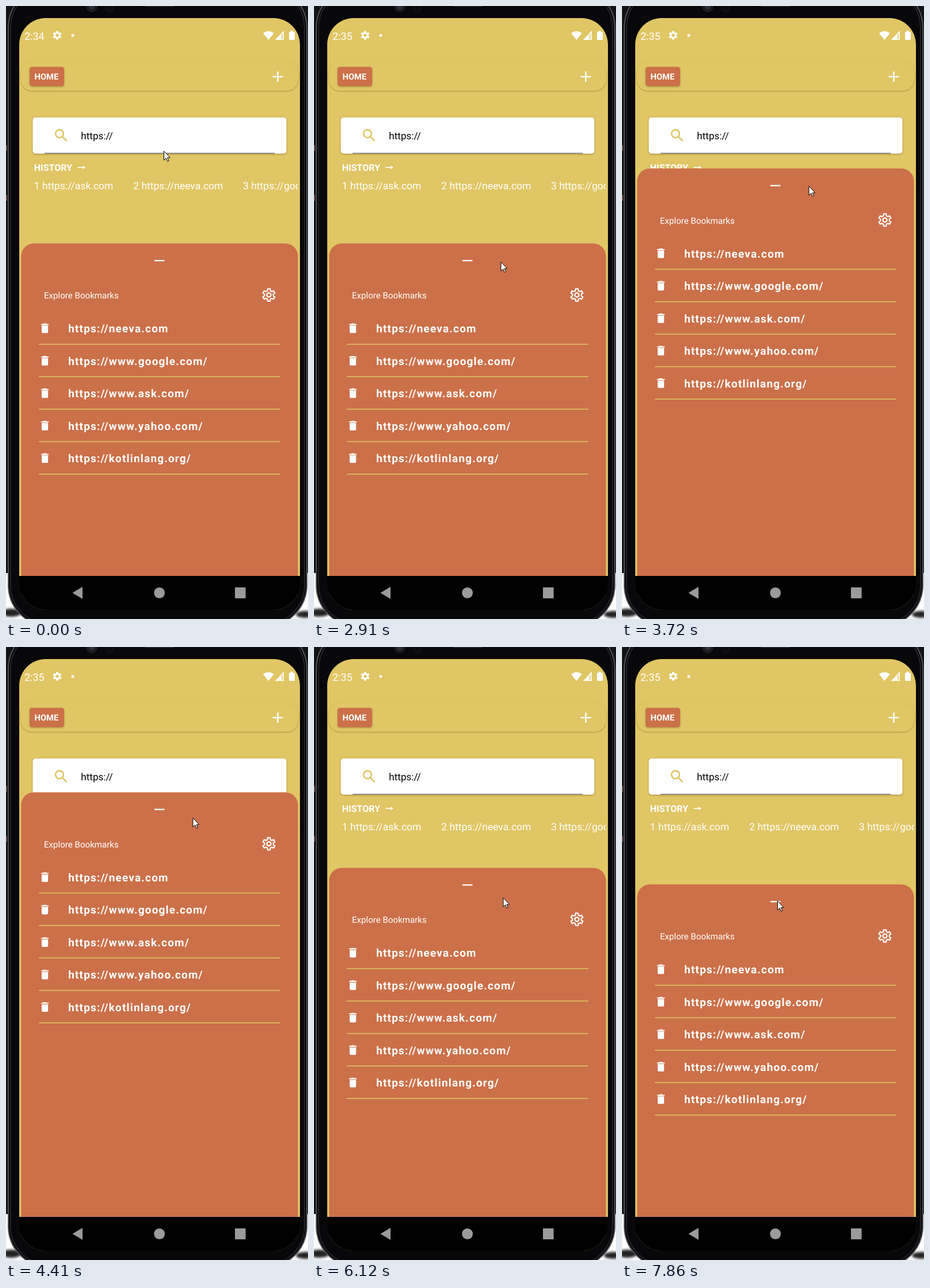
An HTML page for the animation above (8000 ms loop, 525 by 1067 pixels).

```html
<!DOCTYPE html>
<html lang="en">
<head>
<meta charset="utf-8">
<title>Bookmarks sheet</title>
<style>
  html, body { margin: 0; width: 100%; height: 100%; overflow: hidden; background: #0b0b0d; }
  svg { display: block; width: 525px; height: 1067px; }
  text { font-family: Roboto, "Liberation Sans", sans-serif; fill: #fff; white-space: pre; text-rendering: geometricPrecision; }
  .bold { font-weight: 700; }
  .url { font-size: 19px; font-weight: 700; letter-spacing: 1.17px; }
  .hist { font-size: 17.55px; }
  .white { fill: #fff; }
  .gold { fill: #e0c664; }
  .rust { fill: #cc7049; }
  .card { filter: drop-shadow(0 1.5px 1.5px rgba(70, 50, 0, .4)); }
  .bar { filter: drop-shadow(0 1.5px 1.2px rgba(70, 50, 0, .35)); }
</style>
</head>
<body>
<svg viewBox="0 0 525 1067">
  <defs>
    <clipPath id="screen"><rect x="23" y="21" width="488" height="1030" rx="46"/></clipPath>
    <clipPath id="list"><rect x="26" y="295" width="481.5" height="40"/></clipPath>
    <filter id="soft" x="-50%" y="-50%" width="200%" height="200%"><feGaussianBlur stdDeviation="2"/></filter>
    <path id="trash" d="M6 19c0 1.1.9 2 2 2h8c1.1 0 2-.9 2-2V7H6zM19 4h-3.5l-1-1h-5l-1 1H5v2h14z"/>
  </defs>

  <!-- backdrop and phone body -->
  <rect width="525" height="1067" fill="#121315"/>
  <g fill="#8a6252" opacity=".7">
    <rect y="242" width="2" height="10"/><rect y="329" width="2" height="10"/>
  </g>
  <rect class="white" y="987" width="525" height="80"/>
  <g fill="#222" filter="url(#soft)">
    <ellipse cx="9" cy="1056" rx="18" ry="7"/><ellipse cx="520" cy="1059" rx="16" ry="6"/>
  </g>
  <rect x="4" y="-34" width="519" height="1114" rx="72" fill="#08080a" stroke="#505356" stroke-width="2"/>
  <rect x="8" y="-30" width="511" height="1106" rx="68" fill="none" stroke="#222326" stroke-width="2"/>
  <circle cx="149" cy="1" r="10" fill="#1b1c20"/>
  <circle cx="149" cy="1" r="5" fill="#2e3138"/>
  <circle cx="180" cy="4" r="6" fill="#0c0c0e" stroke="#1c1c1f"/>
  <rect x="241" y="-4" width="52" height="5" rx="2" fill="#3a3a3c"/>

  <g clip-path="url(#screen)">
    <rect class="gold" x="23" y="21" width="488" height="972"/>

    <!-- status bar -->
    <text id="clock" x="32" y="58.6" font-size="18">2:34</text>
    <path class="gear white" transform="translate(89 51) scale(.8)"/>
    <circle class="gold" cx="89" cy="51" r="2.8"/>
    <circle class="white" cx="116" cy="51.3" r="2.5"/>
    <path class="white" d="M447 47.5Q456.3 40 465.6 47.5L456.3 59z"/>
    <path class="white" d="M483 44V59H468z" opacity=".45"/>
    <path class="white" d="M478 49V59H468z"/>
    <path d="M482.3 44.5V58.4H469.5z" fill="none" stroke="#fff" stroke-width="1.3"/>
    <path class="white" d="M494.5 45V43h4v2h2.5q1 0 1 1V58q0 1-1 1h-8q-1 0-1-1V46q0-1 1-1z"/>

    <!-- toolbar -->
    <rect class="gold bar" x="25.5" y="97" width="482.5" height="50.5" rx="20"/>
    <rect class="rust card" x="41" y="106" width="60" height="33.5" rx="4.5"/>
    <text class="bold" x="49.5" y="128" font-size="14.7">HOME</text>
    <path d="M463.5 123h18M472.5 114v18" stroke="#fff" stroke-width="2.6"/>

    <!-- search -->
    <rect class="card white" x="46.5" y="194" width="441" height="63" rx="5"/>
    <path d="M67 256.2H467" stroke="#858585" stroke-width="1.5"/>
    <g fill="none" stroke="#e0c664" stroke-width="2.6">
      <circle cx="93" cy="222.3" r="6.9"/><path d="M97.8 227.2L105.5 235"/>
    </g>
    <text x="130.3" y="232.2" font-size="17.1" style="fill:#000">https://</text>

    <!-- history -->
    <text class="bold" x="48.8" y="287" font-size="16">HISTORY</text>
    <path d="M124.5 281H136" stroke="#fff" stroke-width="1.7"/>
    <path class="white" d="M133.5 277.8L137.8 281L133.5 284.2z"/>
    <g clip-path="url(#list)">
      <text class="hist" x="48.8" y="319">1 https://ask.com</text>
      <text class="hist" x="221.2" y="319">2 https://neeva.com</text>
      <text class="hist" x="412" y="319">3 https://google.com</text>
    </g>

    <!-- bookmark sheet -->
    <g id="sheet">
      <rect class="rust" x="26.3" y="413.3" width="481.2" height="800" rx="22"/>
      <rect class="white" x="258" y="442" width="17.5" height="2.3"/>
      <text x="66" y="509" font-size="15.1">Explore Bookmarks</text>
      <g transform="translate(457 503) scale(1.19)" fill="none" stroke="#fff" stroke-width="1.9" stroke-linejoin="round">
        <path class="gear" transform="scale(.92)"/><circle r="3"/>
      </g>
      <g id="rows"></g>
    </g>

    <!-- navigation -->
    <rect x="23" y="992" width="488" height="60"/>
    <g fill="#9b9b9b">
      <path d="M115.5 1021.5L133 1011V1032z"/>
      <circle cx="266.7" cy="1021.5" r="9.4"/>
      <rect x="398" y="1012" width="18.6" height="19" rx="1"/>
    </g>
  </g>

  <path id="cursor" class="white" d="M.5 .5V16.3L4.2 12.9L6.7 18.5L9 17.5L6.5 12H11.3z" stroke="#000" stroke-linejoin="round"/>
</svg>
<script>
const $ = id => document.getElementById(id);
const clamp = (v, lo, hi) => Math.min(hi, Math.max(lo, v));
const easeOut = (u, power) => 1 - (1 - clamp(u, 0, 1)) ** power;

// six-toothed gear, radius 10
const gear = Array.from({ length: 24 }, (_, i) => {
  const tip = i % 4 === 1 || i % 4 === 2;
  const angle = (Math.floor(i / 4) * 60 + (i % 4 < 2 ? -1 : 1) * (tip ? 12 : 18)) * Math.PI / 180;
  const r = tip ? 10 : 7.2;
  return `${r * Math.sin(angle)} ${-r * Math.cos(angle)}`;
});
document.querySelectorAll('.gear').forEach(el => el.setAttribute('d', `M${gear.join('L')}z`));

const sites = ['https://neeva.com', 'https://www.google.com/', 'https://www.ask.com/',
  'https://www.yahoo.com/', 'https://kotlinlang.org/'];
$('rows').innerHTML = sites.map((url, i) => `<g transform="translate(0 ${i * 56.5})">
  <use href="#trash" class="white" transform="translate(56.4 549.8) scale(.93)"/>
  <text class="url" x="108.2" y="568">${url}</text>
  <path d="M57 588.7H477" stroke="#e0c664" stroke-width="1.5"/></g>`).join('');

const LOOP = 8000;
const STEP = 400 / 3;       // the picture refreshes every STEP ms
const FIRST = 505;
const MINUTE = 2320;        // the clock turns over
const OPEN = -162.6;        // offset of the raised sheet
const GRAB = 18, RELEASE = 25, REGRAB = 38, DROP = 47;   // in steps

// cursor strokes, in steps
const strokes = [
  { from: -1, to: 4, x: 362, y: 478, power: 1 },
  { from: 4, to: 8, x: 268, y: 446, power: 1 },
  { from: 15, to: 16, x: 326, y: 456, power: 1 },
  { from: 17, to: GRAB, x: 324.5, y: 445, power: 1 },
  { from: GRAB, to: RELEASE, x: 324.5, y: 297, power: 1.14 },
  { from: 31, to: REGRAB, x: 316, y: 285, power: 1 },
  { from: REGRAB, to: 42, x: 328.5, y: 436, power: .7 },
  { from: 42, to: DROP, x: 332, y: 474, power: 1.5 },
  { from: DROP, to: 51, x: 262, y: 435, power: 1 },
  { from: 52, to: 55, x: 270, y: 441.5, power: 1 }
];

function cursorAt(step) {
  let x = 274, y = 252;
  for (const s of strokes) {
    if (step <= s.from) break;
    const k = easeOut((step - s.from) / (s.to - s.from), s.power);
    x += (s.x - x) * k;
    y += (s.y - y) * k;
  }
  return { x, y };
}

// the sheet follows the pointer while held, then settles open
function sheetAt(step, y) {
  const follow = grip => clamp(y - grip, OPEN, 0);
  if (step < GRAB || step > DROP) return 0;
  if (step <= RELEASE) return follow(443.6);
  if (step < REGRAB) return -146.6 + (OPEN + 146.6) * easeOut((step - RELEASE) / 5, 1.23);
  return follow(464.9);
}

function draw(now) {
  const t = now % LOOP;
  const step = Math.max(-1, Math.floor((t - FIRST) / STEP));
  const { x, y } = cursorAt(step);
  $('cursor').setAttribute('transform', `translate(${x} ${y})`);
  $('sheet').setAttribute('transform', `translate(0 ${sheetAt(step, y)})`);
  $('clock').textContent = t < MINUTE ? '2:34' : '2:35';
}

function loop() {
  draw(performance.now());
  requestAnimationFrame(loop);
}
loop();
</script>
</body>
</html>
```
